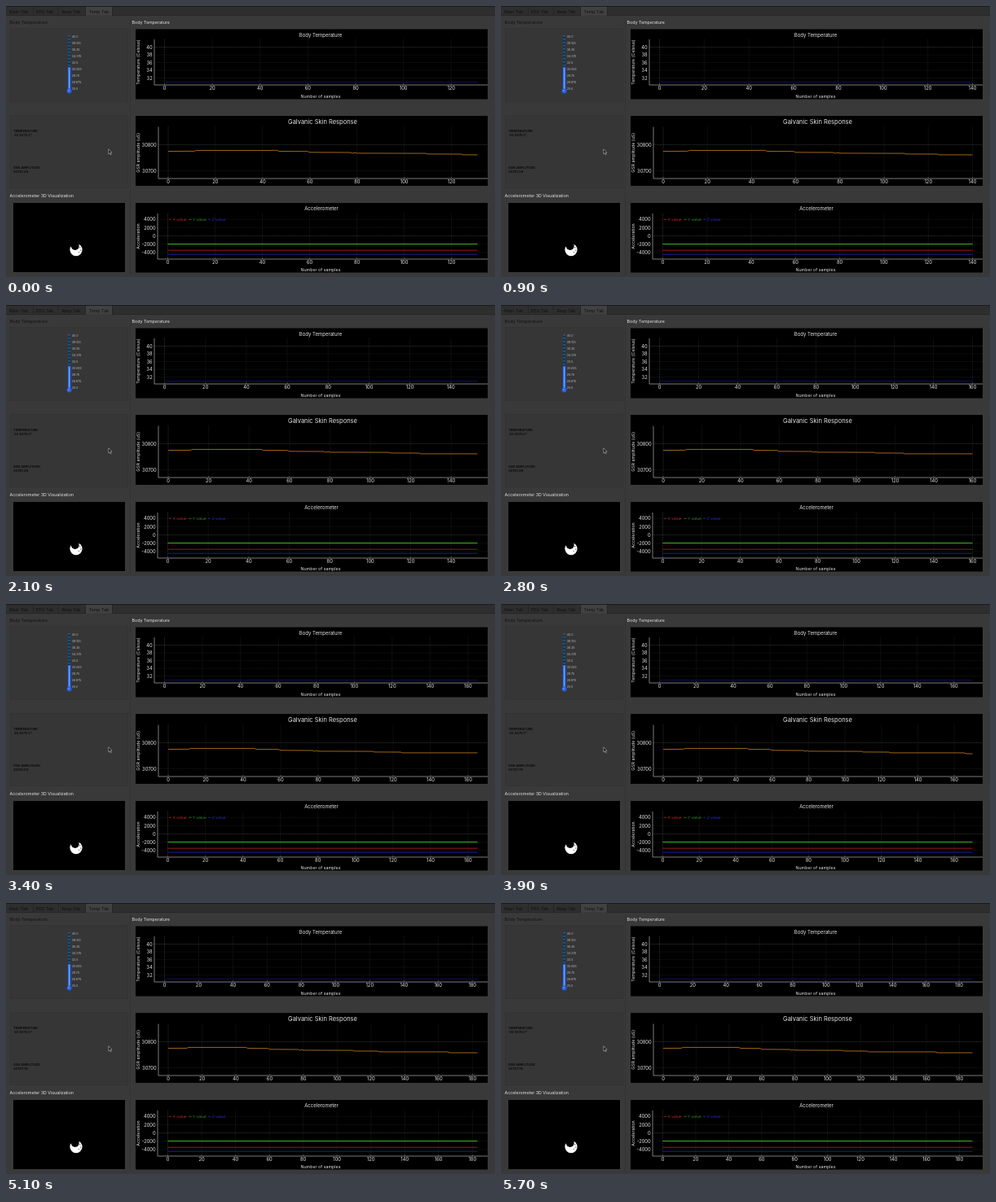
Animation, 600 px wide and 333 px high, one loop 5800 ms. Source, as an HTML page:

```html
<!DOCTYPE html>
<html lang="en">
<head>
<meta charset="utf-8">
<title>Sensor dashboard</title>
<style>
  html, body { margin: 0; width: 100%; height: 100%; overflow: hidden; background: #3a393a; }
  svg { display: block; width: 600px; height: 333px; }
  text { font: 5.3px Inter, "Liberation Sans", sans-serif; fill: #e4e4e4; }
  .dark { fill: #111; }
  .tick { font-size: 5.8px; }
  .title { font-size: 6px; }
  .big { font-size: 7.5px; }
  .scale { font-size: 3.6px; fill: #b9b9b9; }
  .read { font-size: 4px; font-weight: 700; fill: #0d0d0d; }
  .key { font: 4.5px "DejaVu Sans", sans-serif; }
  .mid { text-anchor: middle; }
  .end { text-anchor: end; }
</style>
</head>
<body>
<svg id="stage" viewBox="0 0 600 333" xmlns="http://www.w3.org/2000/svg">
  <rect width="600" height="333" fill="#3a393a"/>
  <rect width="600" height="11.5" fill="#2f2e2f"/>
  <rect width="600" height="1" fill="#1d1c1d"/>
  <rect x="98" y="1" width="32" height="10.5" fill="#424142"/>
  <path d="M0 11.5H98M130 11.5H600M33.5 1V11M64.5 1V11M97.5 1V11M130.5 1V11" stroke="#222" stroke-width=".7"/>
  <g fill="#373637" stroke="#323132" stroke-width=".7">
    <rect x="5.5" y="27.5" width="144" height="90"/>
    <rect x="5.5" y="134.5" width="144" height="89"/>
  </g>
  <path d="M152.5 14V331" stroke="#343334"/>
  <rect x="9" y="242" width="137" height="85"/>
  <g id="fixed"></g>
  <g id="live"></g>
  <circle cx="86" cy="299.6" r="7.6" fill="#fff"/>
  <circle cx="84.8" cy="295" r="4.9"/>
  <rect x="80" y="290" width="11" height="3"/>
  <g><circle cx="90.8" cy="296.8" r=".6"/><circle cx="91.7" cy="300" r=".6"/><circle cx="89.4" cy="302.2" r=".5"/></g>
  <path d="M125.8 175.8v6l1.4-1.2 1 2.2 1-.5-1-2.1h1.8z" fill="#111" stroke="#ddd" stroke-width=".5"/>
</svg>
<script>
const LOOP = 5800, TICK = 100;
const RIGHT = 591, LAST = 578.5;
const fixed = document.getElementById('fixed');
const live = document.getElementById('live');

const text = (x, y, str, cls = '', extra = '') =>
  `<text x="${x}" y="${y}" class="${cls}" ${extra}>${str}</text>`;
const path = (d, color, width = 1, extra = '') =>
  `<path d="${d}" fill="none" stroke="${color}" stroke-width="${width}" ${extra}/>`;
const rect = (x, y, w, h, fill) =>
  `<rect x="${x}" y="${y}" width="${w}" height="${h}" fill="${fill}"/>`;
const turned = (x, y, str) => text(x, y, str, 'mid', `transform="rotate(-90 ${x} ${y})"`);
const dots = 'stroke-dasharray="1 1"';

const plots = [
  { box: [28.5, 114.5], title: 'Body Temperature', cls: 'title', cx: 386, ty: 38.3,
    side: 'Temperature (Celsius)', left: 182, zero: 194.5, top: 41, base: 97,
    marks: [[40, 50.5], [38, 60], [36, 69.5], [34, 79], [32, 88.5]], bright: 50.5,
    below: 113 },
  { box: [135, 221], title: 'Galvanic Skin Response', cls: 'big', cx: 388.5, ty: 144.9,
    side: 'GSR amplitude (uS)', left: 187, zero: 199, top: 148.5, base: 212,
    marks: [[30800, 170.5], [30700, 202.5]], bright: 170.5 },
  { box: [242, 327.5], title: 'Accelerometer', cls: 'title', cx: 387, ty: 251.2,
    side: 'Acceleration', left: 186, zero: 198.5, top: 255, base: 311,
    marks: [[4000, 262.3], [2000, 272.4], [0, 282.5], [-2000, 292.7], [-4000, 302.9]], bright: 282.5,
    below: 326 }
];

function frame(p) {
  const [y0, y1] = p.box;
  let s = rect(159, y0, RIGHT - 159, y1 - y0, '#000');
  s += text(p.cx, p.ty, p.title, 'mid ' + p.cls);
  s += turned(164, (p.top + p.base) / 2, p.side);
  if (p.below) s += text(386, p.below, 'Number of samples', 'mid');
  for (const [label, y] of p.marks) {
    s += text(p.left - 2.3, y + 2.1, label, 'end tick');
    s += path(`M${p.left} ${y}H${RIGHT}`, y === p.bright ? '#484848' : '#202020', .7, dots);
  }
  return s + path(`M${p.left} ${p.top}V${p.base}H${RIGHT}`, '#9a9a9a', .8);
}

function drawFixed() {
  let s = '';
  ['Main Tab', 'EEG Tab', 'Resp Tab', 'Temp Tab'].forEach((name, i) =>
    s += text([15.5, 47.5, 80, 114][i], 8.7, name, 'mid dark'));
  s += text(4.5, 22, 'Body Temperature', 'dark') + text(154.5, 22, 'Body Temperature');
  s += text(4.5, 235, 'Accelerometer 3D Visualization');
  s += text(9, 155.2, 'TEMPERATURE:', 'read') + text(10, 160.2, '30.9375 C°', 'read');
  s += text(9, 199.5, 'GSR AMPLITUDE:', 'read');

  s += rect(76, 36, 3.2, 40, '#17344f');
  s += path('M77.6 36.5V75', '#2f7fb8', 3.2, 'stroke-dasharray=".8 3.2"');
  s += rect(75.8, 75, 3.7, 29, '#2462e6') + rect(77, 76, 1.2, 27, '#77a8ff');
  s += '<circle cx="77.6" cy="104.4" r="2.9" fill="#2462e6"/><circle cx="77" cy="104" r="1" fill="#6196ff"/>';
  for (let i = 0; i < 9; i++) {
    const v = 40 - i * 1.875;
    s += text(80.8, 38.8 + i * 8, Number.isInteger(v) ? v.toFixed(1) : v, 'scale');
  }
  s += plots.map(frame).join('');
  [['X', 200, '#c81e28'], ['Y', 224.5, '#2c8f22'], ['Z', 248, '#2424d0']].forEach(([n, x, c]) =>
    s += path(`M${x} 262.3h3`, c, .8) + text(x + 4.8, 264, n + ' value', 'key', `style="fill:${c}"`));
  fixed.innerHTML = s;
}

// Sample count at known ticks; roughly one new sample per tick.
const counts = [[0, 131], [9, 140], [15, 147], [28, 160], [39, 170], [45, 177], [57, 188]];
function samplesAt(step) {
  const i = Math.max(1, counts.findIndex(c => c[0] >= step));
  const [a, m] = counts[i - 1], [b, n] = counts[i];
  return Math.round(m + (n - m) * (step - a) / (b - a));
}

const gsr = [[0, 178.5], [11, 178.4], [12, 177.4], [46, 177.4], [47, 178.5], [59, 178.7],
  [60, 179.8], [77, 180], [78, 181], [79, 180.2], [80, 180.9], [109, 181.1],
  [110, 181.9], [124, 182], [125, 182.9], [165, 182.9], [167, 184], [200, 184]];

function drawLive(step) {
  const n = samplesAt(step);
  let s = '';
  for (const p of plots) {
    const at = v => +(p.zero + v * (LAST - p.zero) / n).toFixed(2);
    for (let v = 0; v <= n; v += 20) {
      s += path(`M${at(v)} ${p.top}V${p.base}`, v ? '#242424' : '#444', .7, dots);
      s += path(`M${at(v)} ${p.base}v-2`, '#777', .6);
      s += text(at(v), p.base + 6.2, v, 'mid tick');
    }
  }
  const [, g, a] = plots;
  const span = (LAST - g.zero) / n;
  const seen = gsr.filter(q => q[0] < n);
  const d = seen.map(([v, y]) => `${(g.zero + v * span).toFixed(2)} ${y}`).join('L');
  s += path('M194.5 93.5H' + LAST, '#14146e', .8);
  s += path(`M${d}L${LAST} ${seen[seen.length - 1][1]}`, '#b5701c', .9);
  [[300.2, '#981820'], [305.2, '#1c1ca0'], [292.5, '#35b51e']].forEach(([y, c]) =>
    s += path(`M${a.zero} ${y}H${LAST}`, c, 1));
  s += text(9, 204.7, n > 165 ? '30757.78' : '30761.28', 'read');
  live.innerHTML = s;
}

let shown = -1;
function run() {
  const step = Math.floor(performance.now() % LOOP / TICK);
  if (step !== shown) drawLive(shown = step);
  requestAnimationFrame(run);
}
drawFixed();
run();
</script>
</body>
</html>
```
